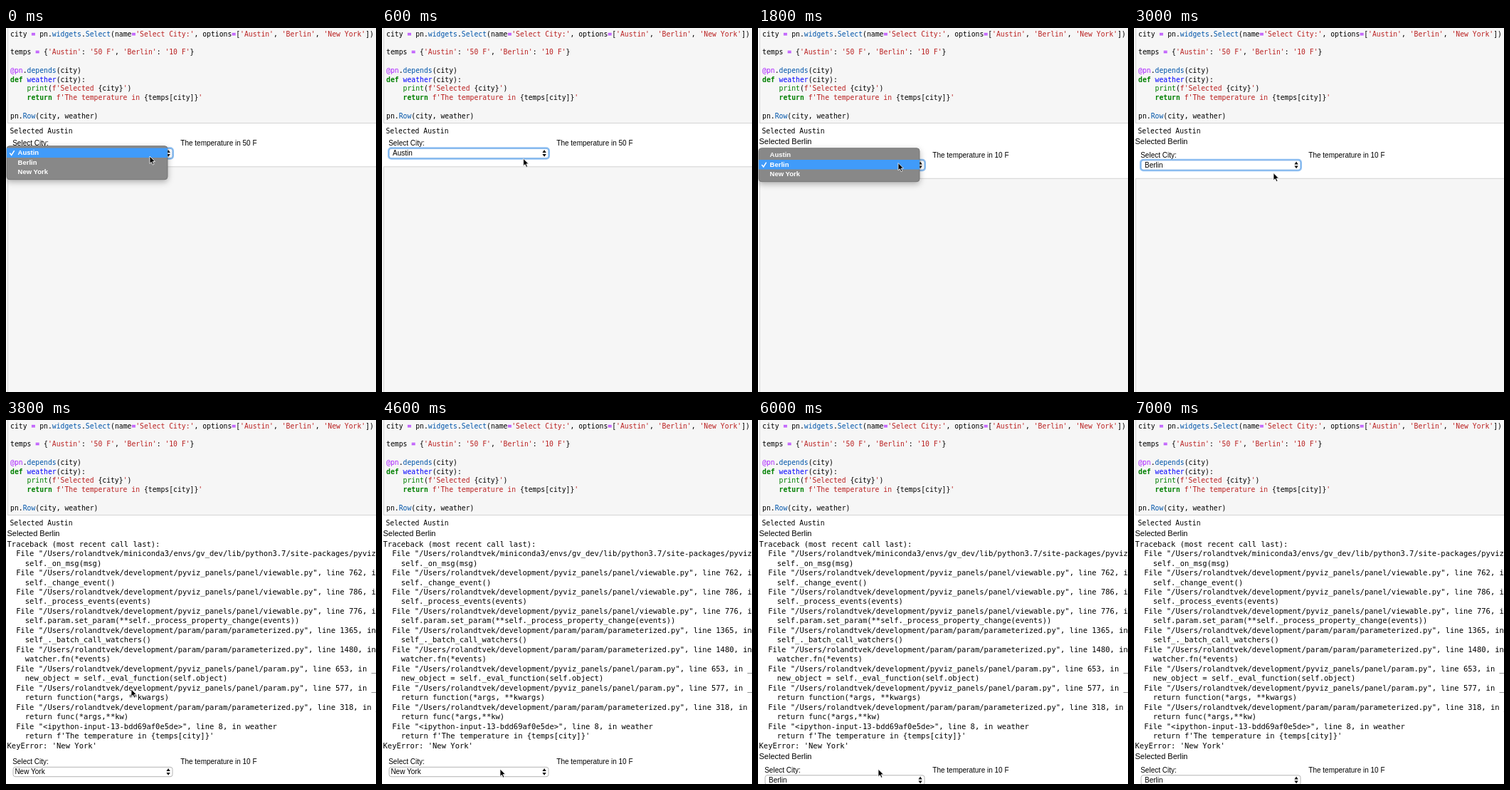
These frames come from a looping animation (520x511 px, 7.8 s). An HTML page:

```html
<!DOCTYPE html>
<html lang="en">
<head>
<meta charset="utf-8">
<title>Select widget demo</title>
<style>
html, body { margin: 0; width: 100%; height: 100%; overflow: hidden; background: #fff; }
svg { display: block; width: 520px; height: 511px; }
text { white-space: pre; fill: #000; }
.code, .out { font: 9.75px "DejaVu Sans Mono", monospace; }
.trace { font: 10.5px "DejaVu Sans Mono", monospace; }
.log { font: 11px "Liberation Sans", Arial, sans-serif; }
.ui { font: 10px "Liberation Sans", Arial, sans-serif; }
.menu text { font: bold 9.5px "Liberation Sans", Arial, sans-serif; fill: #fff; }
.menu { filter: drop-shadow(0 3px 4px rgba(0, 0, 0, .3)); }
.k { fill: #008000; font-weight: bold; }
.b { fill: #008000; }
.s { fill: #ba2121; }
.o { fill: #aa22ff; font-weight: bold; }
.m { fill: #aa22ff; }
.d { fill: #0000ff; }
.p { fill: #0055aa; }
.cell { fill: #f6f6f6; stroke: #d4d4d4; }
</style>
</head>
<body>
<svg viewBox="0 0 520 511">
  <rect class="cell" x="2.5" y="-5" width="530" height="138.5"/>
  <g id="code" class="code"></g>
  <text class="out" x="5.5" y="148">Selected Austin</text>
  <text class="log" id="log1" x="1.5" y="163">Selected Berlin</text>
  <g class="trace" id="trace"></g>
  <text class="log" id="log2" x="1.5" y="476">Selected Berlin</text>
  <g id="row">
    <text class="ui" x="9.2" y="3.5">Select City:</text>
    <text class="ui" id="temp" x="245.3" y="3.5"></text>
    <rect id="ring" x="9" y="6.8" width="226" height="15.4" rx="4" fill="none" stroke="#8fc0f3" stroke-width="2"/>
    <rect id="box" x="10" y="7.8" width="224" height="13.4" rx="3" fill="#fff"/>
    <text class="ui" id="value" y="17.8"></text>
    <path d="M225.4 13.4l2.7-3.9 2.7 3.9zm0 2l2.7 3.9 2.7-3.9z" fill="#111"/>
    <rect class="cell" x="2.5" y="33.3" width="530" height="520"/>
  </g>
  <g class="menu" id="menu">
    <rect x="1" width="226" height="47" rx="4" fill="#888" stroke="#6d6d6d" stroke-width=".8"/>
    <rect id="hover" x="1" width="226" height="13.5" fill="#409bfa"/>
    <path id="check" d="M5.3 .3l2.4 2.8 4-6.2" fill="none" stroke="#fff" stroke-width="1.5"/>
  </g>
  <path id="cursor" d="M0 0v10.4l2.4-2.2 1.7 3.9 1.8-.8-1.7-3.8h3.3z" stroke="#fff" stroke-width=".8"/>
</svg>
<script>
const $ = id => document.getElementById(id);
const add = (parent, tag, attrs, content) => {
  const el = document.createElementNS(parent.namespaceURI, tag);
  for (const key in attrs) el.setAttribute(key, attrs[key]);
  el.textContent = content;
  parent.append(el);
  return el;
};

// «class:text» marks a coloured run.
const code = `city «o:=» pn.«p:widgets».«p:Select»(name«o:=»«s:'Select City:'», options«o:=»[«s:'Austin'», «s:'Berlin'», «s:'New York'»])

temps «o:=» {«s:'Austin'»: «s:'50 F'», «s:'Berlin'»: «s:'10 F'»}

«m:@pn».«p:depends»(city)
«k:def» «d:weather»(city):
    «b:print»(«s:f'Selected »{city}«s:'»)
    «k:return» «s:f'The temperature in »{temps[city]}«s:'»

pn.«p:Row»(city, weather)`;
code.split('\n').forEach((line, i) => {
  const row = add($('code'), 'text', { x: 6.1, y: 12 + i * 12.73 }, '');
  for (const part of line.split(/[«»]/)) {
    const run = /^([a-z]):(.+)$/.exec(part);
    add(row, 'tspan', run ? { class: run[1] } : {}, run ? run[2] : part);
  }
});

const home = '/Users/rolandtvek/';
const dev = home + 'development/';
const view = dev + 'pyviz_panels/panel/viewable.py';
const panel = dev + 'pyviz_panels/panel/param.py';
const param = dev + 'param/param/parameterized.py';
const trace = `Traceback (most recent call last):
  File "${home}miniconda3/envs/gv_dev/lib/python3.7/site-packages/pyviz_comms
    self._on_msg(msg)
  File "${view}", line 762, in
    self._change_event()
  File "${view}", line 786, in
    self._process_events(events)
  File "${view}", line 776, in
    self.param.set_param(**self._process_property_change(events))
  File "${param}", line 1365, in
    self_._batch_call_watchers()
  File "${param}", line 1480, in
    watcher.fn(*events)
  File "${panel}", line 653, in __
    new_object = self._eval_function(self.object)
  File "${panel}", line 577, in __
    return function(*args, **kwargs)
  File "${param}", line 318, in _
    return func(*args,**kw)
  File "<ipython-input-13-bdd69af0e5de>", line 8, in weather
    return f'The temperature in {temps[city]}'
KeyError: 'New York'`;
trace.split('\n').forEach((line, i) => add($('trace'), 'text', { x: 1.5, y: 177.6 + i * 13.48 }, line));

const cities = ['Austin', 'Berlin', 'New York'];
const rowH = 13.5;
cities.forEach((name, i) => add($('menu'), 'text', { x: 16.6, y: 12.8 + i * rowH }, name));

const LOOP = 7800, TICK = 200;
const labelY = [161.5, 178, 479.5, 491];

// Each scene changes only what it names; without hover the menu is closed.
const scenes = [
  { at: 0, layout: 0, city: 'Austin', focus: true, hover: 'Austin' },
  { at: 200, hover: 'Berlin' },
  { at: 600, hover: '' },
  { at: 800, layout: 1, city: 'Berlin', focus: false },
  { at: 1600, focus: true, hover: 'Berlin' },
  { at: 2200, hover: 'New York' },
  { at: 3000, hover: '' },
  { at: 3200, layout: 2, city: 'New York', focus: false },
  { at: 4800, focus: true, hover: 'New York' },
  { at: 5000, hover: 'Berlin' },
  { at: 5600, hover: '' },
  { at: 5800, layout: 3, city: 'Berlin', focus: false }
];

// Pointer path: time, x, y
const path = [
  [0, 202, 180], [400, 200, 188], [1000, 196, 174], [1600, 197, 189.5],
  [1800, 197, 189.5], [2400, 196, 203.5], [3200, 196, 203.5], [3800, 176, 378],
  [4400, 166, 490], [4800, 166, 490], [5200, 166, 477], [5800, 166, 477],
  [6600, 178, 530], [LOOP, 178, 530]
];

const show = (id, on) => $(id).style.display = on ? '' : 'none';
const move = (id, x, y) => $(id).setAttribute('transform', `translate(${x} ${y})`);

function pointer(t) {
  const i = path.findIndex(p => p[0] > t);
  const [t0, x0, y0] = path[i - 1], [t1, x1, y1] = path[i];
  const k = (t - t0) / (t1 - t0);
  move('cursor', x0 + (x1 - x0) * k, y0 + (y1 - y0) * k);
}

function draw(t) {
  const { layout, city, focus, hover } = Object.assign({}, ...scenes.filter(s => s.at <= t));
  const top = labelY[layout], row = cities.indexOf(city);
  show('log1', layout > 0);
  show('trace', layout > 1);
  show('log2', layout > 2);
  move('row', 0, top);
  $('temp').textContent = `The temperature in ${layout ? 10 : 50} F`;
  $('value').textContent = city;
  $('value').setAttribute('x', row === 2 ? 12.4 : 15);
  $('box').setAttribute('stroke', focus ? '#6fa9e6' : '#b4b4b4');
  show('ring', focus);
  show('menu', hover);
  move('menu', 0, top + 4.2 - row * rowH);
  move('hover', 0, 2.8 + cities.indexOf(hover) * rowH);
  move('check', 0, 9.6 + row * rowH);
  pointer(t);
}

let last;
function tick() {
  const t = Math.floor(performance.now() % LOOP / TICK) * TICK;
  if (t !== last) draw(last = t);
  requestAnimationFrame(tick);
}
tick();
</script>
</body>
</html>
```
